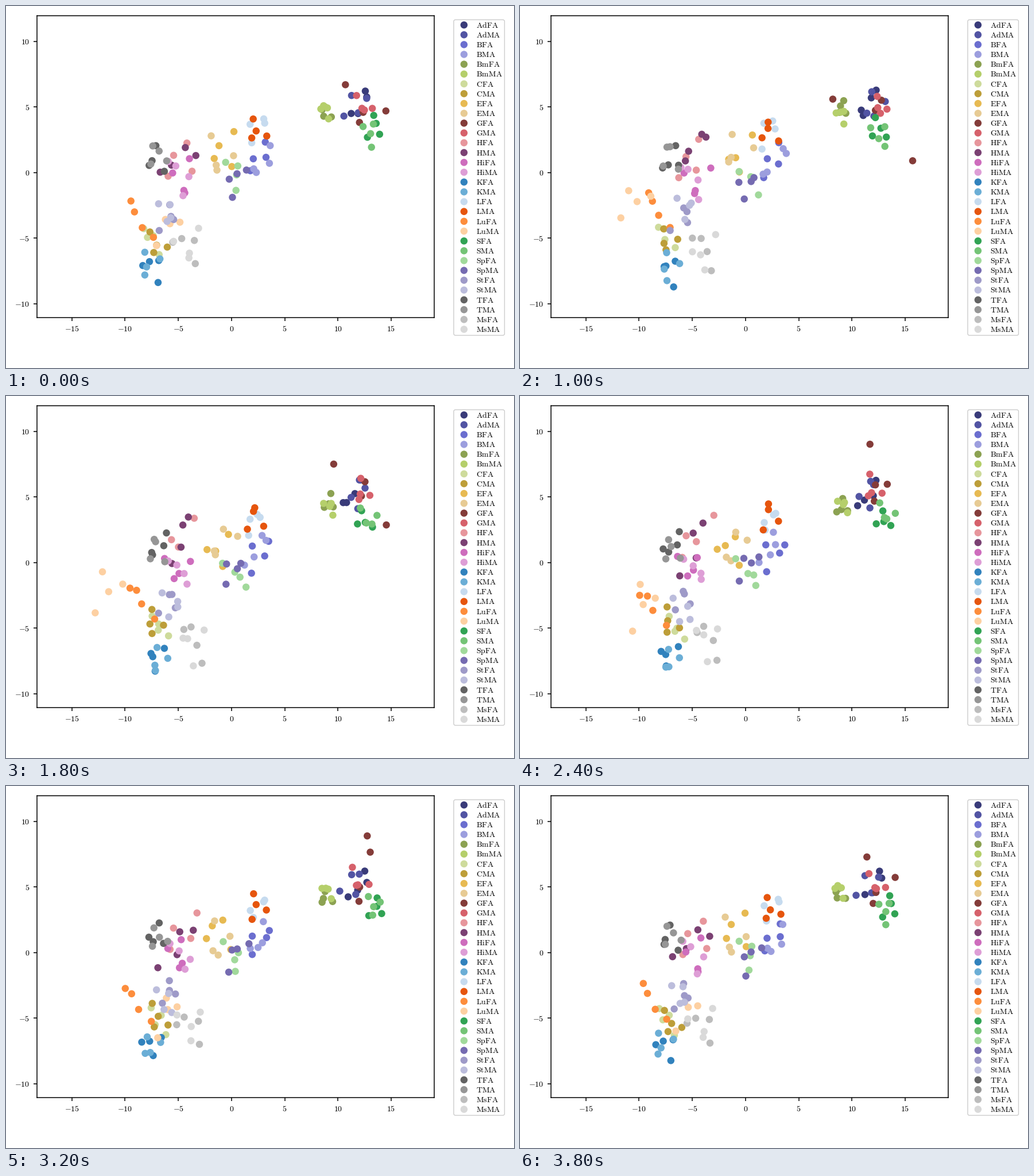
Recreate the animation shown at these times as a matplotlib script. Size 885x632 px, loop 4000 ms.

```python
import numpy as np
import matplotlib.pyplot as plt
from matplotlib.animation import FuncAnimation
from matplotlib.patches import FancyBboxPatch

W, H, DPI = 885, 632, 100
FRAMES, LOOP = 20, 4000
DOT = 81  # marker area in points squared

plt.rcParams["mathtext.fontset"] = "cm"
plt.rcParams["font.size"] = 10

# species: centre x, centre y, spread; each has an FA and an MA group
SPECIES = {
    "Ad": (11.7, 5.2, .8), "B": (2.6, .9, .9), "Bm": (9, 4.5, .4),
    "C": (-7.1, -5, .7), "E": (-1, 1.3, 1), "G": (12.3, 5.3, .6),
    "H": (-4.9, 1.3, 1.2), "Hi": (-4.9, -.4, .9), "K": (-7.3, -7.2, .7),
    "L": (2.3, 3.3, .7), "Lu": (-8.6, -3.3, 1.1), "S": (13, 3.3, .6),
    "Sp": (.3, -.5, .8), "St": (-5.9, -3.2, .7), "T": (-7, 1.1, .7),
    "Ms": (-3.9, -5.8, 1),
}
names = [f"{s}{kind}" for s in SPECIES for kind in ("FA", "MA")]
count = len(names)

# both 20-colour maps in a row, thinned to one colour per group
palette = [*plt.cm.tab20b.colors, *plt.cm.tab20c.colors]
skipped = {int(4 + 4.5 * k) for k in range(8)}
colors = [c for k, c in enumerate(palette) if k not in skipped]

rng = np.random.default_rng(7)
layout = np.repeat(list(SPECIES.values()), 2, axis=0)[:, None, :]
centre = layout[..., :2]
spread = layout[..., 2:] * [.85, 1]

# four dots per group, scattered evenly about its centre
offset = rng.normal(size=(count, 4, 2))
offset -= offset.mean(axis=1, keepdims=True)
offset /= offset.std(axis=1, keepdims=True)

# every group sways a little and every dot circles in its own way
sway = rng.normal(0, .25, size=(2, count, 1, 2))
wobble = rng.normal(0, .3, size=(2, count, 4, 2)) * spread


def orbit(a, mid, cos, sin):
    return np.array(mid) + np.array(cos) * np.cos(a) + np.array(sin) * np.sin(a)


def positions(ms):
    a = 2 * np.pi * ms / LOOP
    pts = orbit(a, centre + .9 * spread * offset, *(sway + wobble))
    # the wide excursions
    pts[names.index("LuMA")] += orbit(a, (0, 0), (2.6, -.8), (-1.8, .9))
    gfa = pts[names.index("GFA")]
    gfa[0] = orbit(a, (14.3, 4.3), (.2, .4), (1.4, -3.4))
    gfa[1] = orbit(a, (10.5, 7.4), (.2, -.7), (-2.3, -1.8))
    return pts.reshape(-1, 2)


fig = plt.figure(figsize=(W / DPI, H / DPI), dpi=DPI, facecolor="white")

ax = fig.add_axes([54 / W, 1 - 544 / H, 692 / W, 527 / H])
ax.set(xlim=(-18.27, 19.04), ylim=(-11.06, 11.96))
ax.tick_params(length=4.3, width=1.1, pad=5)
ax.spines[:].set_linewidth(1.1)
for axis, ticks in ((ax.xaxis, range(-15, 16, 5)), (ax.yaxis, range(-10, 11, 5))):
    axis.set_ticks(ticks, [f"${v}$" for v in ticks])

dots = ax.scatter(*positions(0).T, s=DOT, lw=0,
                  c=np.repeat(colors, 4, axis=0), zorder=2)

# legend, laid out in pixels
panel = fig.add_axes([0, 0, 1, 1])
panel.set(xlim=(0, W), ylim=(H, 0))
panel.axis("off")
panel.add_patch(FancyBboxPatch((783, 27), 82.5, 545, fc="white", ec="0.8",
                               lw=1, boxstyle="round,pad=3,rounding_size=3"))
rows = 33.1 + 17.14 * np.arange(count)
panel.scatter(np.full(count, 797.9), rows, s=DOT, lw=0, c=colors, zorder=2)
for name, y in zip(names, rows):
    panel.text(819, y + 4.6, rf"$\mathrm{{{name}}}$", va="baseline")


def update(i):
    dots.set_offsets(positions(i * LOOP / FRAMES))
    return dots,


anim = FuncAnimation(fig, update, frames=FRAMES, interval=LOOP / FRAMES, repeat=True)
plt.show()
```
